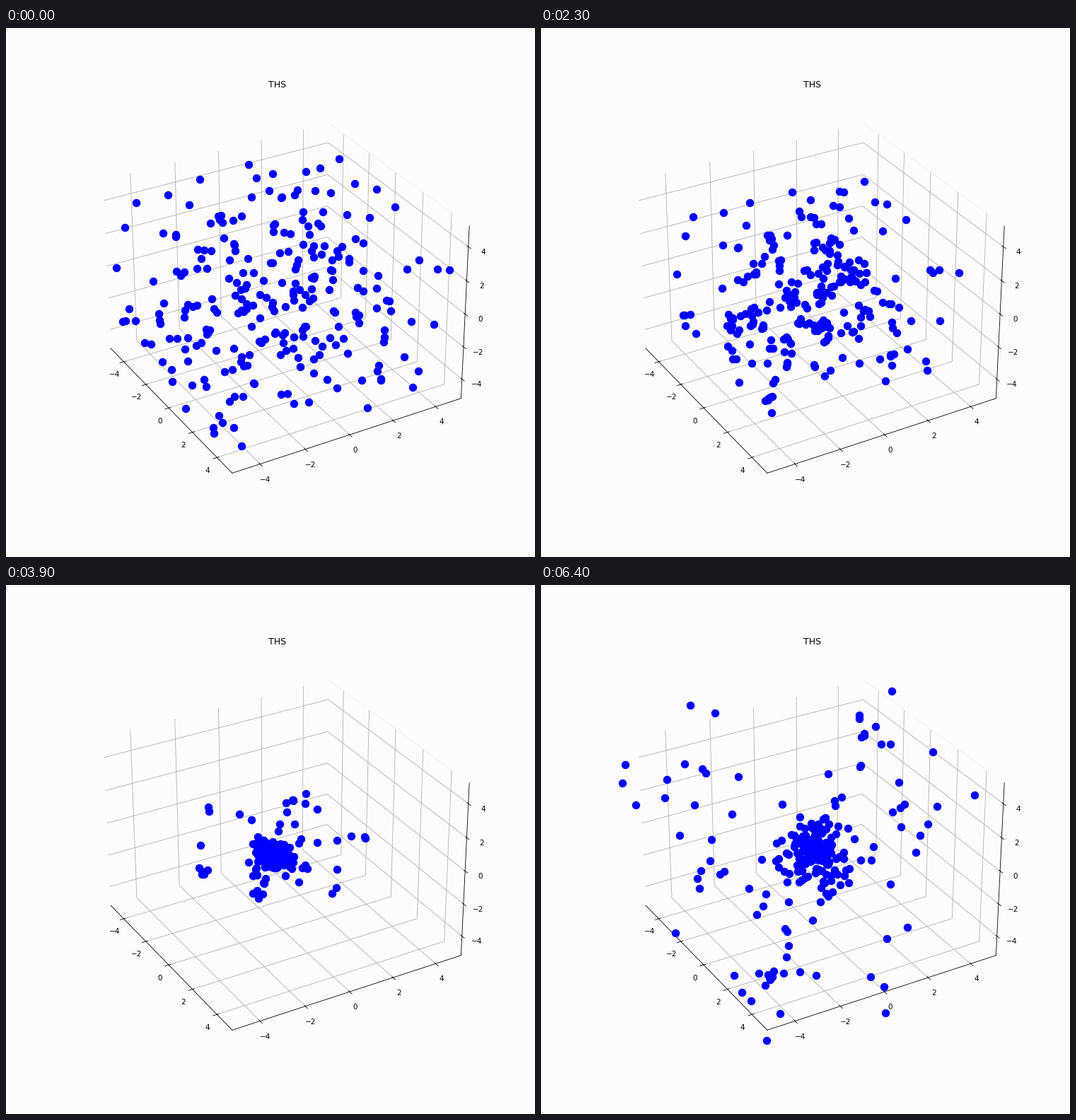
Recreate the animation shown at these times as a matplotlib script. Size 748 by 748 pixels, loop 6.5 s.

```python
import numpy as np
import matplotlib.pyplot as plt
from matplotlib.animation import FuncAnimation
from matplotlib.lines import Line2D

SIZE = 748
FRAMES = 65
COUNT = 250
HALF = 5.0            # half the side of the starting cube
GRAVITY = 0.215       # G times the total mass, per frame squared
SOFTENING = 0.3
PAPER = "#fcfcfc"


def pull(pos):
    """Softened gravity of all particles on each other."""
    gap = pos[None, :, :] - pos[:, None, :]
    dist2 = (gap ** 2).sum(axis=2) + SOFTENING ** 2
    return GRAVITY / COUNT * (gap / dist2[:, :, None] ** 1.5).sum(axis=1)


def simulate():
    """Cold collapse of a uniform cube, one step per frame."""
    rng = np.random.default_rng(5)
    pos = rng.uniform(-HALF, HALF, (COUNT, 3))
    vel = np.zeros_like(pos)
    path = [pos]
    for _ in range(FRAMES - 1):
        vel = vel + pull(pos)
        pos = pos + vel
        path.append(pos)
    return path


path = simulate()

fig = plt.figure(figsize=(10, 10), dpi=SIZE / 10, facecolor=PAPER)
ax = fig.add_subplot(projection="3d", facecolor=PAPER)
dots, = ax.plot(*path[0].T, "o", color="blue", markersize=10)

ax.set_title("THS")
edge = HALF * 25 / 24
ax.set(xlim=(-edge, edge), ylim=(-edge, edge), zlim=(-edge, edge))
ax.view_init(elev=30, azim=-30)
for axis in (ax.xaxis, ax.yaxis, ax.zaxis):
    axis.set_pane_color((1, 1, 1, 0))

# Faint upper rim of the back wall
rim = np.array([(457, 135), (632, 263)]) / SIZE
fig.add_artist(Line2D(rim[:, 0], 1 - rim[:, 1], color="#f1f1f1", lw=0.8))


def update(i):
    dots.set_data_3d(*path[i].T)
    return dots,


anim = FuncAnimation(fig, update, frames=FRAMES, interval=100,
                     repeat=True, repeat_delay=0, blit=False)
plt.show()
```
